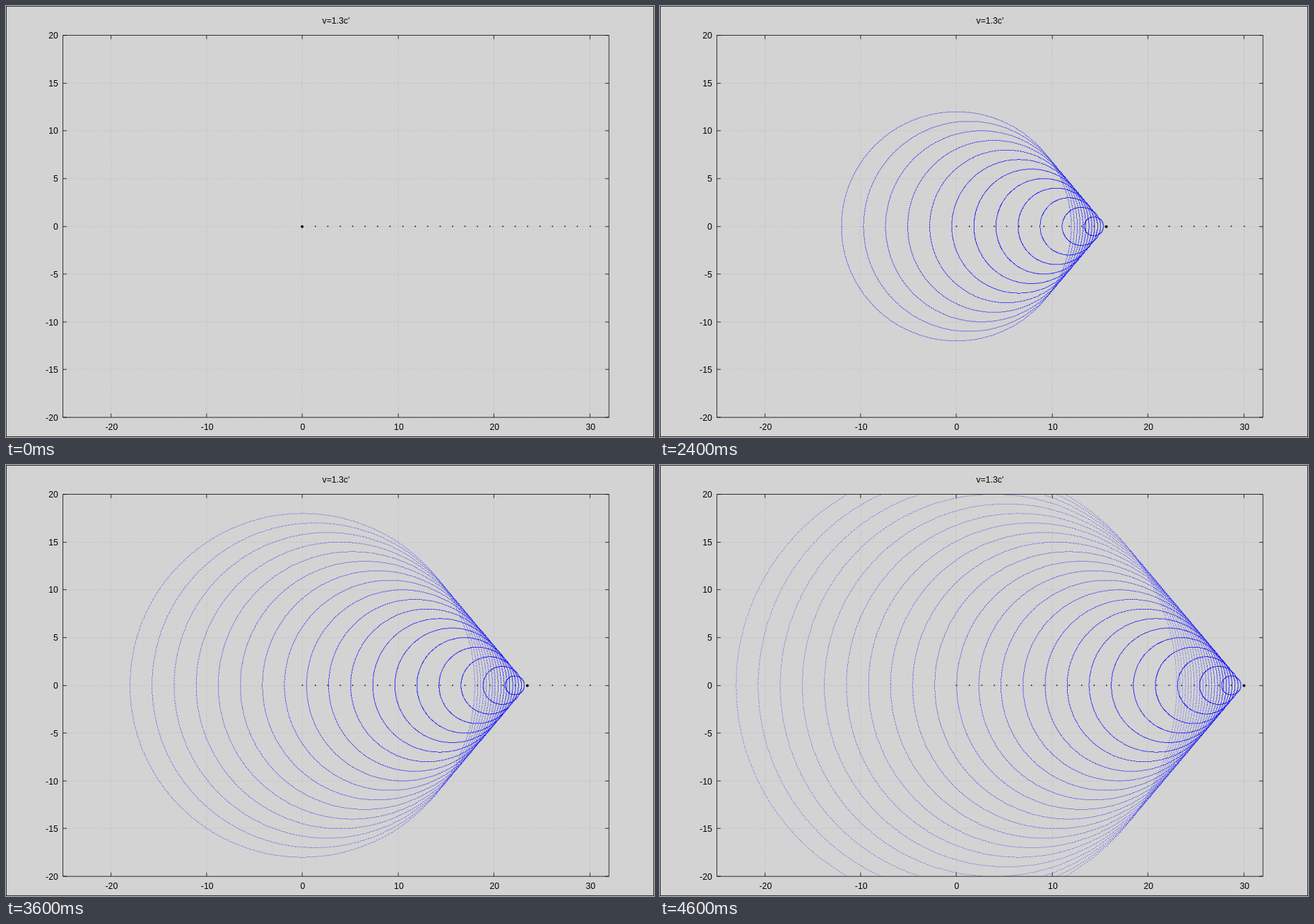
An HTML page with a canvas that plays this animation: 917 px wide and 611 px high, repeating every 4.8 s.

```html
<!DOCTYPE html>
<html lang="en">
<head>
<meta charset="utf-8">
<title>Wavefronts of a fast source</title>
<style>
  html, body { margin: 0; width: 100%; height: 100%; overflow: hidden; background: #d3d3d3; }
  svg, canvas { position: absolute; left: 0; top: 0; width: 917px; height: 611px; }
  line, rect { fill: none; stroke: #000; stroke-width: 1; }
  .grid { stroke: #a0a0a0; stroke-dasharray: 1 3; }
  text { font: 16px "Liberation Sans", Arial, sans-serif; fill: #000; }
  .mid { text-anchor: middle; }
  .end { text-anchor: end; }
</style>
</head>
<body>
<svg id="axes" viewBox="0 0 1200 800" preserveAspectRatio="none"></svg>
<canvas id="waves" width="917" height="611"></canvas>
<script>
// The plot is laid out on a 1200 x 800 pixel grid and scaled down to the stage.
const WIDTH = 1200, HEIGHT = 800;
const LEFT = 105, RIGHT = 1116, TOP = 54, BOTTOM = 763;
const SX = (RIGHT - LEFT) / 57, SY = (BOTTOM - TOP) / 40;
const px = x => Math.round(LEFT + (x + 25) * SX);
const py = y => Math.round(BOTTOM - (y + 20) * SY);

const STEPS = 24, STEP_MS = 200, RING_POINTS = 720;
const sourceX = k => k * 30 / 23;

const axes = document.getElementById('axes');
function add(tag, attrs, text) {
  const el = document.createElementNS('http://www.w3.org/2000/svg', tag);
  for (const name in attrs) el.setAttribute(name, attrs[name]);
  if (text !== undefined) el.textContent = text;
  axes.append(el);
}
const line = (x1, y1, x2, y2, cls = '') => add('line', { x1, y1, x2, y2, class: cls });
const label = (x, y, cls, text) => add('text', { x, y, class: cls }, text);
const frame = (x, y, width, height) => add('rect', { x, y, width, height });

function drawAxes() {
  const l = LEFT + .5, r = RIGHT + .5, t = TOP + .5, b = BOTTOM + .5, tick = 7;
  frame(.5, .5, WIDTH - 1, HEIGHT - 1);
  for (let v = -20; v <= 30; v += 10) {
    const x = px(v) + .5;
    line(x, b, x, t, 'grid');
    line(x, b, x, b - tick);
    line(x, t, x, t + tick);
    label(x + 1, 787, 'mid', v);
  }
  for (let v = -20; v <= 20; v += 5) {
    const y = py(v) + .5;
    line(l, y, r, y, 'grid');
    line(l, y, l + tick, y);
    line(r, y, r - tick, y);
    label(96.5, y + 6, 'end', v);
  }
  frame(l, t, RIGHT - LEFT, BOTTOM - TOP);
  label(611, 33, 'mid', "v=1.3c'");
}

const ctx = document.getElementById('waves').getContext('2d');
ctx.scale(917 / WIDTH, 611 / HEIGHT);

// Each wavefront is a fixed number of single pixels, so it thins out as it grows.
function drawRing(cx, radius) {
  ctx.beginPath();
  for (let i = 0; i < RING_POINTS; i++) {
    const a = i / RING_POINTS * 2 * Math.PI;
    const x = px(cx + radius * Math.cos(a));
    const y = py(radius * Math.sin(a));
    if (y > TOP && y < BOTTOM) ctx.rect(x, y, 1, 1);
  }
  ctx.fill();
}

function drawSource(k) {
  ctx.beginPath();
  ctx.arc(px(sourceX(k)) + .5, py(0) + .5, 2.6, 0, 2 * Math.PI);
  ctx.fill();
}

function draw(step) {
  ctx.clearRect(0, 0, WIDTH, HEIGHT);
  ctx.fillStyle = '#00f';
  for (let k = 0; k < step; k++) drawRing(sourceX(k), step - k);
  ctx.fillStyle = '#000';
  for (let k = 0; k < STEPS; k++) ctx.fillRect(px(sourceX(k)), py(0) - 1, 2, 2);
  drawSource(step);
}

let shown = -1;
const start = performance.now();
function tick() {
  const step = Math.floor((performance.now() - start) / STEP_MS) % STEPS;
  if (step !== shown) draw(shown = step);
  requestAnimationFrame(tick);
}

drawAxes();
tick();
</script>
</body>
</html>
```
